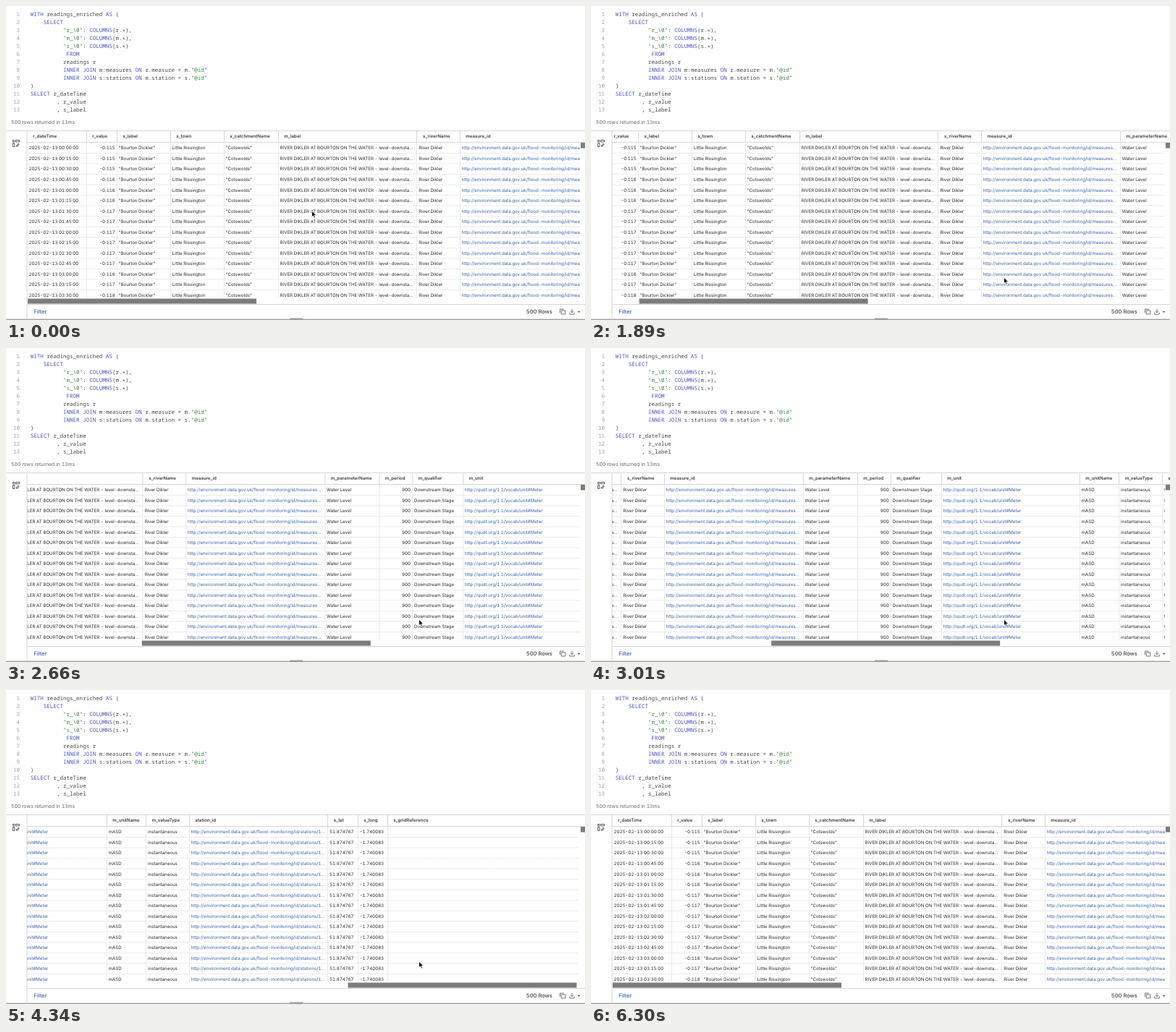
Animation of 800x434 px, one loop 7 s. Source, as an HTML page:

```html
<!DOCTYPE html>
<html lang="en">
<head>
<meta charset="utf-8">
<title>Query results</title>
<style>
  html, body { margin: 0; width: 100%; height: 100%; overflow: hidden; background: #fefefe; }
  svg { display: block; width: 800px; height: 434px; }
  text { font: 6.15px Inter, "Open Sans", sans-serif; font-variant-numeric: tabular-nums; fill: #2b2b2b; white-space: pre; text-rendering: geometricPrecision; }
  .code { font: 7.56px "Noto Sans Mono", "DejaVu Sans Mono", monospace; fill: #4a4a4a; }
  .key { fill: #4a55bd; }
  .str { fill: #3c8a45; }
  .star { baseline-shift: -1.5px; }
  .num { fill: #a0a0a0; text-anchor: end; }
  .head { font-weight: 600; fill: #3a3a3a; }
  .right { text-anchor: end; }
  .link { fill: #3b62ad; }
  .status { font-size: 6.85px; fill: #666; }
  .foot { font-size: 7.5px; font-weight: 500; fill: #444; }
  .filter { fill: #3b62ad; }
  .rule { stroke: #d6d6d6; stroke-width: 1; fill: none; }
  .grid { stroke: #d6d6d6; stroke-width: .8; stroke-dasharray: 1.2 .8; fill: none; }
  .icon { stroke: #555; stroke-width: .8; fill: none; }
</style>
</head>
<body>
<svg viewBox="0 0 800 434">
  <defs>
    <clipPath id="headClip"><rect x="29" y="173" width="771" height="16"/></clipPath>
    <clipPath id="bodyClip"><rect x="29" y="188" width="764" height="216"/></clipPath>
  </defs>
  <rect width="800" height="434" fill="#fefefe"/>
  <g id="editor"></g>
  <text class="status" x="7" y="163.4">500 rows returned in 13ms</text>
  <g clip-path="url(#headClip)"><g id="head"></g></g>
  <g clip-path="url(#bodyClip)"><g id="body"></g></g>
  <path class="rule" d="M0 172.5H800M29 188.5H800M29.5 412.5H800M29 173V432"/>
  <rect id="thumb" x="30" y="404.5" width="316" height="7" fill="#7c7c7c"/>
  <rect x="794" y="189" width="6" height="7.5" fill="#7c7c7c"/>
  <g class="icon" style="stroke:#333">
    <path d="M9.5 185.5H11.8V187.8H9.5ZM13.5 185.5H18.5V187.8H13.5ZM9.5 189.5H11.8V194.5H9.5Z"/>
    <path d="M17 190.3V193.3H14M15.4 191.9L14 193.3L15.4 194.7M15.6 191.6L17 190.2L18.4 191.6"/>
  </g>
  <text class="foot filter" x="38.3" y="425.3">Filter</text>
  <text class="foot" x="718.8" y="425.3">500 Rows</text>
  <g class="icon">
    <path d="M767.3 420.8H772.7V426H767.3ZM765.5 424.2V419H770.8"/>
    <path d="M782 418.7V423.6M779.8 421.5L782 423.8L784.2 421.5M778.7 423.6V426H785.3V423.6"/>
    <path d="M789.5 421.8H793.5L791.5 424Z" fill="#555" stroke="none"/>
  </g>
  <path d="M0 433.2H800" stroke="#7b7b7b"/>
  <rect id="handle" x="392" y="431.5" width="18" height="1.6" fill="#999"/>
  <path id="cursor" d="M0 0V8.6L2 6.9L3.4 10L4.9 9.3L3.5 6.3H6.2Z" fill="#111" stroke="#fff" stroke-width=".8"/>
</svg>
<script>
const SVG = 'http://www.w3.org/2000/svg';
const $ = id => document.getElementById(id);

function add(parent, tag, attrs, content) {
  const node = document.createElementNS(SVG, tag);
  for (const name in attrs) node.setAttribute(name, attrs[name]);
  if (content !== undefined) node.textContent = content;
  return parent.appendChild(node);
}

// ---- SQL editor ----
const query = `WITH readings_enriched AS (
    SELECT
          "r_\\0": COLUMNS(r.*),
          "m_\\0": COLUMNS(m.*),
          "s_\\0": COLUMNS(s.*)
           FROM
          readings r
          INNER JOIN m:measures ON r.measure = m."@id"
          INNER JOIN s:stations ON m.station = s."@id"
)
SELECT r_dateTime
        , r_value
        , s_label`;

function tokenClass(token) {
  if (token[0] === '"') return 'str';
  if (token === '*') return 'star';
  return /^[A-Z]{2,}$/.test(token) ? 'key' : '';
}

query.split('\n').forEach((line, i) => {
  const y = 14.1 + i * 11.02;
  add($('editor'), 'text', { class: 'code num', x: 19, y }, i + 1);
  const text = add($('editor'), 'text', { class: 'code', x: 33.7, y });
  line.split(/("[^"]*"|\b[A-Z]{2,}\b|\*)/).forEach(token =>
    add(text, 'tspan', { class: tokenClass(token) }, token));
});

// ---- Result table ----
const ROWS = 15, PITCH = 14.54;
const lastDigits = '555666777777678';
const pad = n => String(n).padStart(2, '0');
const timestamp = i => `2025-02-13 ${pad(i >> 2)}:${pad(i % 4 * 15)}:00`;
const api = 'http://environment.data.gov.uk/flood-monitoring/id/';

// left edge, title, cell value, style
const columns = [
  [29, 'r_dateTime', timestamp],
  [111, 'r_value', i => '-0.11' + lastDigits[i], 'right'],
  [153, 's_label', '"Bourton Dickler"'],
  [227, 's_town', 'Little Rissington'],
  [301, 's_catchmentName', '"Cotswolds"'],
  [376, 'm_label', 'RIVER DIKLER AT BOURTON ON THE WATER - level-downsta…'],
  [567.7, 's_riverName', 'River Dikler'],
  [627, 'measure_id', api + 'measures…', 'link'],
  [819, 'm_parameterName', 'Water Level'],
  [894, 'm_period', '900', 'right'],
  [940, 'm_qualifier', 'Downstream Stage'],
  [1010, 'm_unit', 'http://qudt.org/1.1/vocab/unit#Meter', 'link'],
  [1201, 'm_unitName', 'mASD'],
  [1255.5, 'm_valueType', 'instantaneous'],
  [1315, 'station_id', api + 'stations/1…', 'link'],
  [1506.5, 's_lat', '51.874767'],
  [1548, 's_long', '-1.740083'],
  [1589, 's_gridReference', '']
];

columns.forEach(([x, title, value, style = ''], c) => {
  add($('head'), 'text', { class: 'head', x: x + 8.3, y: 182.4 }, title);
  if (c) {
    const edge = Math.floor(x) + .5;
    add($('head'), 'path', { class: 'rule', d: `M${edge} 173V188` });
    add($('body'), 'path', { class: 'grid', d: `M${edge} 188V404` });
  }
  const cellX = style === 'right' ? columns[c + 1][0] - 2.3 : x + 2.6;
  for (let i = 0; i < ROWS; i++) {
    const content = typeof value === 'function' ? value(i) : value;
    if (content) add($('body'), 'text', { class: style, x: cellX, y: 198.4 + i * PITCH }, content);
  }
});
for (let i = 1; i < ROWS; i++) {
  add($('body'), 'path', { class: 'grid', d: `M29 ${188.9 + i * PITCH}H1853` });
}

// ---- Motion ----
const LOOP = 7000, TICK = 70, MAX_SCROLL = 1062, THUMB_RATIO = 2.4;
const RETURN_START = 4550, RETURN_END = 5320, HEADER_LAG = 38;
const clamp = v => Math.min(1, Math.max(0, v));
const progress = (t, from, to) => clamp((t - from) / (to - from));
const smooth = u => u * u * (3 - 2 * u);

const drag = [[1470, 0], [2380, 281], [3010, 526], [3500, 827], [3780, MAX_SCROLL]];
const slope = i => (drag[i + 1][1] - drag[i][1]) / (drag[i + 1][0] - drag[i][0]);
const tangent = i => i === 0 || i === drag.length - 1 ? 0 : (slope(i - 1) + slope(i)) / 2;

function scrollAt(t) {
  if (t >= RETURN_START) return MAX_SCROLL * (1 - progress(t, RETURN_START, RETURN_END)) ** 2.125;
  if (t <= drag[0][0]) return 0;
  const i = drag.findIndex((p, k) => k + 1 < drag.length && t < drag[k + 1][0]);
  if (i < 0) return MAX_SCROLL;
  const [t0, a] = drag[i], [t1, b] = drag[i + 1];
  const span = t1 - t0, u = (t - t0) / span;
  return a + (b - a) * smooth(u)
    + span * u * (1 - u) * (tangent(i) * (1 - u) - tangent(i + 1) * u);
}

function cursorAt(t) {
  const move = (smooth(progress(t, 0, 420)) + smooth(progress(t, 980, 1400))) / 2;
  const leave = progress(t, 5810, 6020) ** 1.5;
  return [422.5 + 148 * move + 14 * leave, 283 + 92 * move + 62 * leave];
}

function render(time) {
  const t = Math.floor(time % LOOP / TICK) * TICK;
  const scroll = scrollAt(t);
  // the header trails the cells while the table springs back
  const headScroll = t > RETURN_START && t < RETURN_END ? scrollAt(t - HEADER_LAG) : scroll;
  const [x, y] = cursorAt(t);
  $('body').setAttribute('transform', `translate(${-scroll})`);
  $('head').setAttribute('transform', `translate(${-headScroll})`);
  $('thumb').setAttribute('x', 30 + headScroll / THUMB_RATIO);
  $('cursor').setAttribute('transform', `translate(${x} ${y})`);
  const present = t < 6020 ? 'visible' : 'hidden';
  $('cursor').setAttribute('visibility', present);
  $('handle').setAttribute('visibility', present);
}

const start = performance.now();
function frame() {
  render(performance.now() - start);
  requestAnimationFrame(frame);
}
frame();
</script>
</body>
</html>
```
